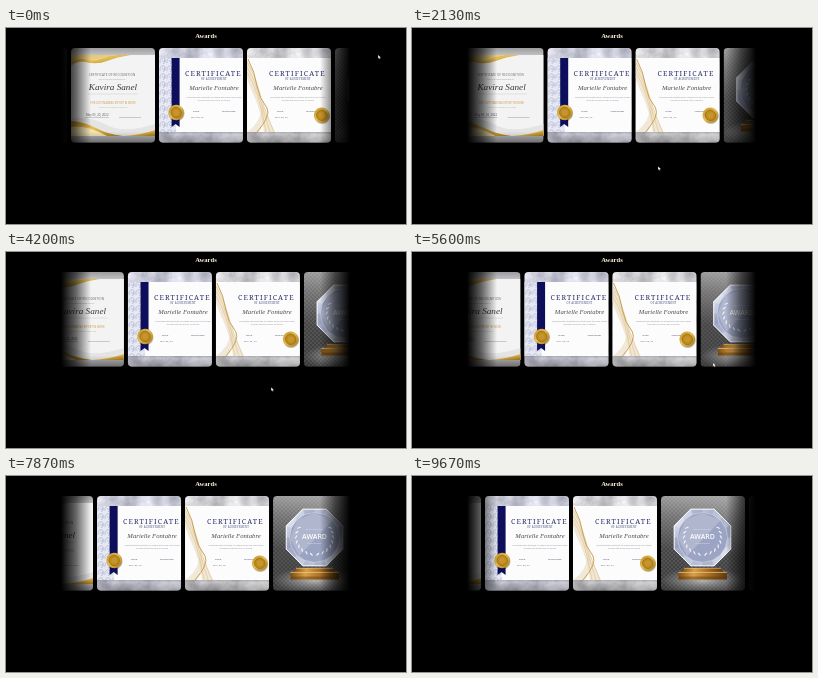
Write an HTML page that moves like this. It is 400 by 196 pixels and loops after 9.74 s.

```html
<!DOCTYPE html>
<html lang="en">
<head>
<meta charset="utf-8">
<title>Awards</title>
<style>
  html, body { margin: 0; height: 100%; overflow: hidden; background: #000; }
  svg { display: block; width: 400px; height: 196px; }
  text { font-family: "Liberation Serif", serif; }
  .slab { font-family: "Noto Serif", serif; font-weight: 500; }
  .sans { font-family: "Open Sans", sans-serif; }
</style>
</head>
<body>
<svg viewBox="0 0 400 196">
  <defs>
    <clipPath id="view"><rect x="55" y="20" width="289" height="95"/></clipPath>
    <clipPath id="card"><rect width="84" height="94.5" rx="4"/></clipPath>
    <linearGradient id="fade">
      <stop stop-color="#000"/><stop offset=".5" stop-color="#000" stop-opacity=".58"/>
      <stop offset="1" stop-color="#000" stop-opacity="0"/>
    </linearGradient>
    <linearGradient id="gold" x2="1" y2="1">
      <stop stop-color="#c48d1c"/><stop offset=".45" stop-color="#e3bd55"/><stop offset="1" stop-color="#a87512"/>
    </linearGradient>
    <linearGradient id="base">
      <stop stop-color="#7d4d12"/><stop offset=".3" stop-color="#d9a04a"/>
      <stop offset=".65" stop-color="#a36a22"/><stop offset="1" stop-color="#5f390c"/>
    </linearGradient>
    <linearGradient id="grey" x2="0" y2="1">
      <stop stop-color="#9c9c9e"/><stop offset=".12" stop-color="#d8d8da"/>
      <stop offset=".88" stop-color="#bdbdbe"/><stop offset="1" stop-color="#8e8e90"/>
    </linearGradient>
    <linearGradient id="dark" x1=".55" x2=".45" y2="1">
      <stop stop-color="#a2a2a3"/><stop offset=".25" stop-color="#747475"/>
      <stop offset=".6" stop-color="#454546"/><stop offset="1" stop-color="#3c3c3d"/>
    </linearGradient>
    <radialGradient id="glow">
      <stop stop-color="#fff" stop-opacity=".6"/><stop offset="1" stop-color="#fff" stop-opacity="0"/>
    </radialGradient>
    <linearGradient id="glass" x2="1" y2="1">
      <stop stop-color="#f0f3fa"/><stop offset=".4" stop-color="#a3abc8"/>
      <stop offset=".7" stop-color="#b9c1d8"/><stop offset="1" stop-color="#e8ecf5"/>
    </linearGradient>
    <linearGradient id="shade" x2="0" y2="1">
      <stop offset=".88" stop-color="#333" stop-opacity="0"/><stop offset="1" stop-color="#333" stop-opacity=".35"/>
    </linearGradient>
    <pattern id="checker" width="4" height="4" patternUnits="userSpaceOnUse">
      <path d="M0 0h2v4h2v-2h-4z" fill="#fff" opacity=".09"/>
    </pattern>
    <pattern id="floral" width="7" height="8" patternUnits="userSpaceOnUse">
      <path d="M1 7Q0 3 3 2T6 5Q4 7 3 4M4 8Q7 7 6 3" fill="none" stroke="#b3b9d6" stroke-width=".8"/>
    </pattern>
    <filter id="marble" x="0" y="0" width="1" height="1" color-interpolation-filters="sRGB">
      <feTurbulence type="fractalNoise" baseFrequency=".07" numOctaves="4" seed="4"/>
      <feColorMatrix values=".6 0 0 0 .47 .6 0 0 0 .47 .56 0 0 0 .53 0 0 0 0 1"/>
    </filter>
  </defs>
  <text x="200" y="10.4" font-size="6.6" font-weight="bold" fill="#fff3dc" text-anchor="middle">Awards</text>
  <g clip-path="url(#view)">
    <g id="strip"></g>
    <rect x="55" y="20" width="30" height="95" fill="url(#fade)"/>
    <rect x="55" y="20" width="30" height="95" fill="url(#fade)" transform="matrix(-1 0 0 1 399 0)"/>
  </g>
  <path id="cursor" d="M0 0v3.4l.9-.8.7 1.4.7-.4-.7-1.3h1.1z" fill="#fff" stroke="#555" stroke-width=".2"/>
</svg>
<script>
const LOOP = 9740, PITCH = 88;
const $ = id => document.getElementById(id);

const text = (s, x, y, size, fill, extra = '') =>
  `<text x="${x}" y="${y}" font-size="${size}" fill="${fill}" ${extra}>${s}</text>`;
const line = (d, stroke, width, extra = '') =>
  `<path d="${d}" fill="none" stroke="${stroke}" stroke-width="${width}" ${extra}/>`;
const fill = (d, color, extra = '') => `<path d="${d}" fill="${color}" ${extra}/>`;
const rect = (x, y, w, h, color, extra = '') =>
  `<rect x="${x}" y="${y}" width="${w}" height="${h}" fill="${color}" ${extra}/>`;
const whole = (color, extra) => rect(0, 0, 84, 95, color, extra);
const repeat = (n, f) => Array.from({ length: n }, (_, i) => f(i)).join('');
const polygon = (n, cx, cy, r, turn = 0) => repeat(n, i => {
  const a = (i + turn) / n * 2 * Math.PI;
  return `${i ? 'L' : 'M'}${(cx + r * Math.cos(a)).toFixed(2)} ${(cy + r * Math.sin(a)).toFixed(2)}`;
}) + 'z';
const middle = 'text-anchor="middle"';

const seal = (x, y) =>
  fill(polygon(24, x + .5, y + .9, 7.8), '#000', 'opacity=".25"') +
  fill(polygon(24, x, y, 7.8), 'url(#gold)') +
  `<circle cx="${x}" cy="${y}" r="5.2" fill="#bb8a22" stroke="#94690f" stroke-width=".7"/>` +
  `<circle cx="${x}" cy="${y}" r="3" fill="#c6952c"/>`;

// Wording shared by both achievement certificates, starting at x.
const wording = x =>
  text('CERTIFICATE', x, 27.8, 7, '#2a2f66', 'class="slab" letter-spacing="1.15"') +
  text('OF ACHIEVEMENT', x + 29, 32.2, 2.6, '#4a4e7c', `class="slab" letter-spacing=".2" ${middle}`) +
  text('Marielle Fontabre', x + 29, 42, 6.7, '#4a4b55', `font-style="italic" ${middle}`) +
  text('Presented with gratitude for steady work and care shown', x + 29, 50, 2.1, '#8a8a92', `class="sans" ${middle}`) +
  text('through the whole year of service', x + 29, 53, 2.1, '#8a8a92', `class="sans" ${middle}`) +
  text('DATE', x + 8, 63.5, 2.4, '#3b3e66', 'class="slab"') +
  text('SIGNATURE', x + 37, 63.5, 2.4, '#3b3e66', 'class="slab"') +
  text('MAY 05, 22', x + 6, 69.5, 2.5, '#555', 'class="sans"');

const paper = tint => whole('#bbb', 'filter="url(#marble)"') + whole(tint, 'opacity=".3"') +
  rect(0, 10, 84, 75.5, '#555', 'opacity=".25"') + rect(0, 10, 84, 74, '#fcfcfd');

const recognition = () =>
  whole('url(#grey)') + rect(0, 7, 84, 81, '#f3f3f3') +
  fill('M0 7H60Q46 9 36 13T14 14Q6 13 0 18z', 'url(#gold)') +
  fill('M0 7H48Q38 8 30 11T12 11Q5 11 0 14z', '#f1dfa6', 'opacity=".6"') +
  fill('M0 70Q20 68 36 77T84 76V88H0z', '#e4e4e5') +
  fill('M0 73Q14 74 25 80T52 88H0z', 'url(#gold)') +
  fill('M0 79Q16 78 28 84L36 88H0z', '#f2e2b0') +
  fill('M52 88Q70 87 84 82V88z', 'url(#gold)') +
  text('CERTIFICATE OF RECOGNITION', 41, 27.6, 3, '#666', `class="sans" letter-spacing=".15" ${middle}`) +
  text('this is proudly presented to', 41, 32, 2.1, '#999', `class="sans" ${middle}`) +
  text('Kavira Sanel', 42, 41.5, 9.2, '#3a3a3a', `font-style="italic" ${middle}`) +
  line('M17 46H67', '#aaa', .3) +
  text('FOR OUTSTANDING EFFORT IN WORK', 42, 56, 2.6, '#d09a45', `class="sans" ${middle}`) +
  text('for the care shown in each task', 42, 60, 2, '#aaa', `class="sans" ${middle}`) +
  text('May 05, 20, 2022', 15, 68, 2.9, '#555', 'class="sans"') +
  line('M14 69.5H38M48 69.5H70', '#888', .4);

const ribbon = () => paper('#dfe2f2') +
  rect(0, 10, 17, 74, '#e6e8f2') + rect(0, 10, 17, 74, 'url(#floral)') +
  fill('M12.6 10h8v69l-4-3-4 3z', '#0d0f5c') + wording(26) + seal(17.2, 64.5);

const waves = () => paper('#f2eee2') +
  fill('M0 12Q7 24 11 40T28 84H17Q15 66 7 48T0 28z', '#efe3cb', 'opacity=".8"') +
  fill('M0 84Q15 74 15 54Q21 70 12 84z', '#e9dcc0', 'opacity=".6"') +
  repeat(3, i => line(`M0 ${14 + i * 5}Q${8 - i} ${26 + i * 4} ${12 - i} ${42 + i * 2}T${27 - i * 4} 84`,
    '#cfae70', .4)) +
  line('M1 11Q8 24 10 38Q12 50 20 60Q24 68 10 84', '#c69a45', .9) +
  wording(22) + seal(74.8, 67.3);

const backdrop = () => whole('url(#dark)') + whole('url(#checker)');
const dim = () => backdrop() + whole('#000', 'opacity=".65"');

const laurel = side => repeat(8, i => {
  const a = (100 + i * 16) * Math.PI / 180;
  const x = 41.5 + side * 18.5 * Math.cos(a), y = 41 + 17.5 * Math.sin(a);
  const turn = side * (i * 16 + 45);
  return `<ellipse cx="${x}" cy="${y}" rx="2" ry=".65" fill="#f3f5fb" transform="rotate(${turn} ${x} ${y})"/>`;
});

const crystal = () => backdrop() +
  `<ellipse cx="41.5" cy="85" rx="42" ry="14" fill="url(#glow)"/>` +
  fill(polygon(8, 41.5, 41.5, 31, .5), 'url(#glass)') +
  repeat(8, i => `<path d="M41.5 41.5L70.1 29.6V41.5z" fill="${i % 2 ? '#fff' : '#66718f'}" opacity=".25" transform="rotate(${i * 45} 41.5 41.5)"/>`) +
  line(polygon(8, 41.5, 41.5, 30.6, .5), '#fbfcff', .9) +
  fill(polygon(16, 41.5, 41.5, 25), '#9ba4c2', 'stroke="#dce1ee" stroke-width=".5"') +
  fill('M24 24L41 17 60 24 26 60 17 42z', '#fff', 'opacity=".2"') +
  laurel(-1) + laurel(1) +
  text('best of the year', 41.5, 34, 2.4, '#e8ecf6', `class="sans" ${middle}`) +
  text('AWARD', 41.5, 43, 7, '#fff', `class="sans" font-weight="600" ${middle}`) +
  text('of excellence', 41.5, 48, 2.4, '#e8ecf6', `class="sans" ${middle}`) +
  fill('M23 72H60L62 76H21z', 'url(#base)') + line('M23 72.3H60', '#e9c380', .6) +
  rect(17.5, 76, 48.5, 7.5, 'url(#base)') + line('M17.5 76.4H66', '#f3d08a', .7) +
  rect(17.5, 80.5, 48.5, 3, '#5a360c', 'opacity=".45"');

const cards = [dim, recognition, ribbon, waves, crystal, dim];
$('strip').innerHTML = cards.map((draw, i) =>
  `<g transform="translate(${(i - 2) * PITCH} 20)"><g clip-path="url(#card)">${draw()}${whole('url(#shade)')}</g></g>`).join('');

// Rows are [time, ...values], interpolated linearly between rows.
function sample(keys, t) {
  const i = Math.max(1, keys.findIndex(k => k[0] >= t));
  const a = keys[i - 1], b = keys[i], p = (t - a[0]) / (b[0] - a[0]);
  return a.slice(1).map((v, j) => v + (b[j + 1] - v) * p);
}
const scroll = [[0, 153], [1130, 142], [2930, 130.5], [5600, 112.5], [7000, 99.8], [8670, 83], [LOOP, 72.3]];
const pointer = [[0, 372, 27], [150, 386, 40], [600, 320, 157], [1130, 284, 111], [2000, 250, 136],
  [2500, 235, 146], [2930, 232, 140], [4000, 260, 139], [5600, 301, 111], [6200, 318, 144], [LOOP, 318, 144]];

function frame(now) {
  const t = now % LOOP;
  $('strip').setAttribute('transform', `translate(${sample(scroll, t)[0]} 0)`);
  $('cursor').setAttribute('transform', `translate(${sample(pointer, t)})`);
  $('cursor').setAttribute('visibility', t < 6600 ? 'visible' : 'hidden');
  requestAnimationFrame(frame);
}
frame(performance.now());
</script>
</body>
</html>
```
